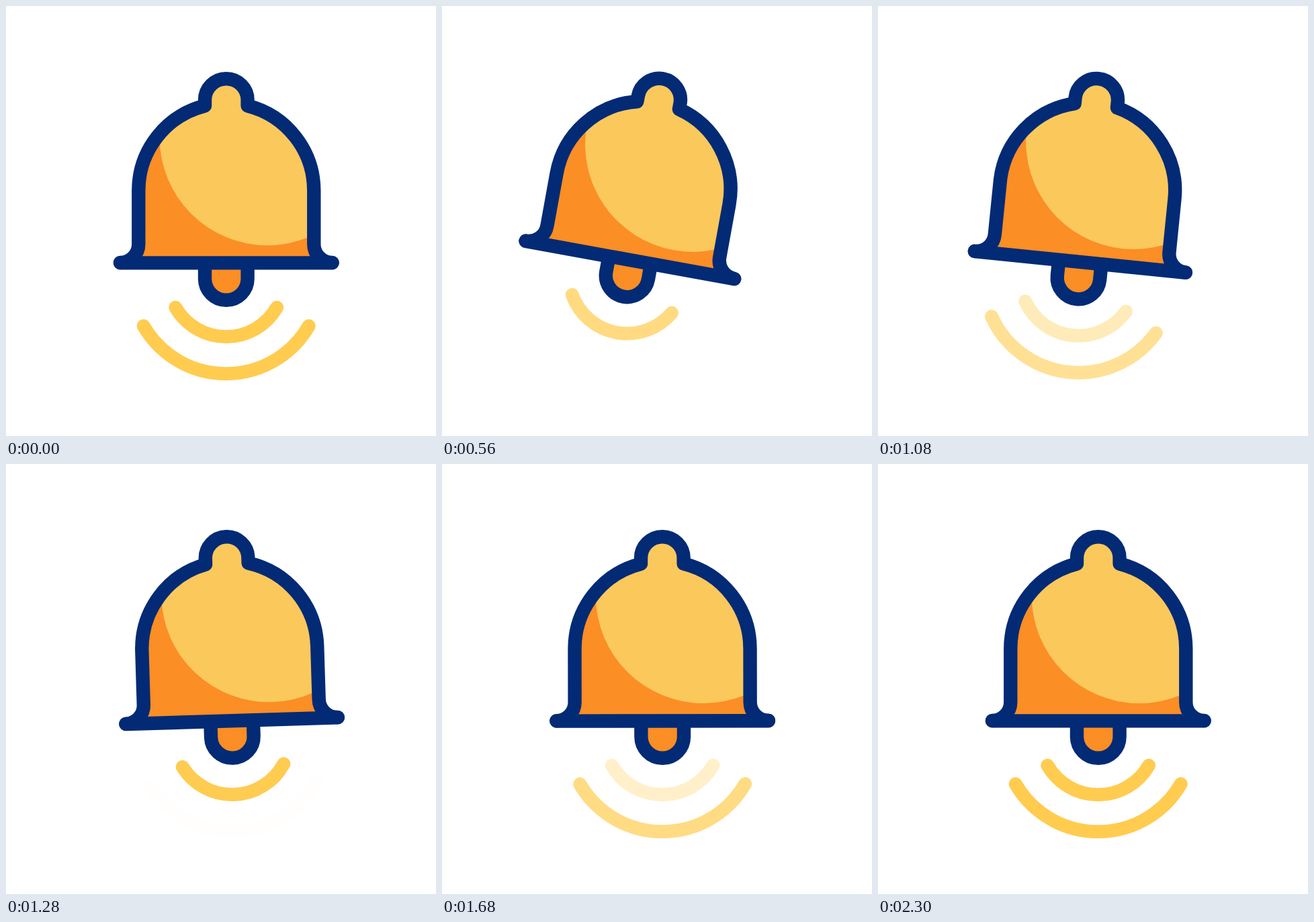
Write an HTML page that moves like this. It is 640x640 px and loops after 2400 ms.

```html
<!DOCTYPE html>
<html lang="en">
<head>
<meta charset="utf-8">
<title>Ringing bell</title>
<style>
  html, body { margin: 0; width: 100%; height: 100%; overflow: hidden; background: #fff; }
  svg { display: block; width: 100%; height: 100%; }
  .line { stroke: #032a75; stroke-width: 20.4; stroke-linecap: round; stroke-linejoin: round; }
  .wave { fill: none; stroke: #ffcc50; stroke-width: 20; stroke-linecap: round; }
</style>
</head>
<body>
<svg viewBox="0 0 640 640">
  <defs>
    <path id="body" d="M170 382A27.5 27.5 0 0 0 197.3 354V275A130.5 130.5 0 0 1 296 148.5V140A31.8 31.8 0 0 1 359.6 140V148.5A130.5 130.5 0 0 1 458.3 275V354A27.5 27.5 0 0 0 485.6 382"/>
    <clipPath id="inside"><use href="#body"/></clipPath>
  </defs>
  <g id="bell">
    <g id="clapper">
      <path class="line" fill="#fb8e24" d="M296 382V406A31.8 31.8 0 0 0 359.6 406V382"/>
    </g>
    <use href="#body" fill="#fb8e24"/>
    <circle cx="389" cy="196" r="160.3" fill="#fbc85c" clip-path="url(#inside)"/>
    <use href="#body" class="line" fill="none"/>
    <path class="line" d="M170 382.4H485.6"/>
    <path class="wave" id="inner"/>
    <path class="wave" id="outer"/>
  </g>
</svg>
<script>
  const LOOP = 2400, STEP = 20;
  const START = 200, BEAT = 300, REST = START + 5 * BEAT, END = REST + 2 * BEAT;
  const PULSE_START = 637, PULSE_BEAT = 310;
  const PIVOT = { x: 327.7, y: 114 };
  const $ = id => document.getElementById(id);
  const bell = $('bell'), clapper = $('clapper'), inner = $('inner'), outer = $('outer');

  const clamp = (v, max) => Math.min(Math.max(v, 0), max);
  const ease = p => p * p * (3 - 2 * p);
  const progress = (t, from, to) => ease(clamp((t - from) / (to - from), 1));

  // Eases through evenly spaced poses, holding the first before and the last after.
  function through(poses, t, start, beat) {
    const p = clamp((t - start) / beat, poses.length - 1);
    const i = Math.min(Math.floor(p), poses.length - 2);
    return poses[i] + (poses[i + 1] - poses[i]) * ease(p - i);
  }

  // Alternates between 1 and 0 for five beats, then stays at 0.
  function pulse(t) {
    const p = clamp((t - PULSE_START) / PULSE_BEAT, 5);
    return ease(Math.abs(1 - p % 2));
  }

  // Arc below the clapper, ending 30 degrees under the horizontal on both sides.
  function wavePath(r) {
    const dx = r * Math.cos(Math.PI / 6), y = 405.2 + r / 2;
    return `M${PIVOT.x - dx} ${y}A${r} ${r} 0 0 0 ${PIVOT.x + dx} ${y}`;
  }

  function draw(t) {
    const angle = through([0, 13, -13, 6, -6, 0], t, START, BEAT);
    const sway = through([0, -2.7, 0], t, REST, BEAT);
    bell.setAttribute('transform', `rotate(${angle} ${PIVOT.x} ${PIVOT.y})`);
    clapper.setAttribute('transform', `translate(${sway} 0)`);

    const dip = PULSE_START - 222;
    const fadeOut = 1 - progress(t, START, dip);
    const fadeIn = progress(t, END - 140, END);
    const level = pulse(t);
    inner.setAttribute('opacity', Math.max(fadeOut, Math.min(progress(t, dip, PULSE_START), level), fadeIn));
    outer.setAttribute('opacity', Math.max(fadeOut, 1 - level));
  }

  function tick() {
    const t = performance.now() % LOOP;
    draw(Math.floor(t / STEP) * STEP);
    requestAnimationFrame(tick);
  }

  inner.setAttribute('d', wavePath(87));
  outer.setAttribute('d', wavePath(142));
  tick();
</script>
</body>
</html>
```
